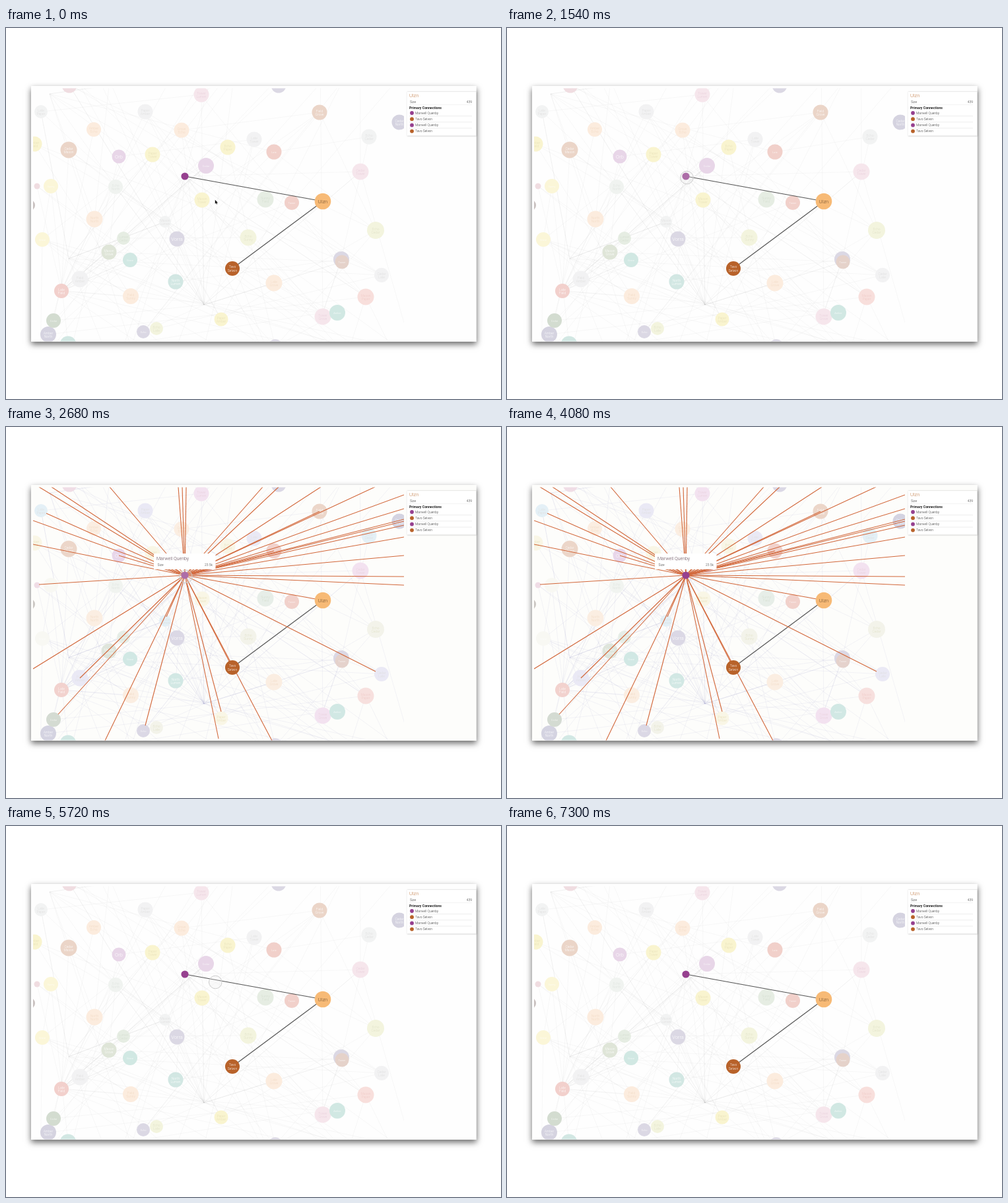
Write an HTML page with a canvas that moves like this. It is 750 px wide and 563 px high and loops after 7.94 s.

```html
<!DOCTYPE html>
<html lang="en">
<head>
<meta charset="utf-8">
<title>Connection graph</title>
<style>
  html, body { margin: 0; width: 100%; height: 100%; overflow: hidden; background: #fff; }
  canvas { display: block; }
</style>
</head>
<body>
<canvas id="stage" width="750" height="563"></canvas>
<script>
const W = 750, H = 563, LOOP = 7940;
const FONT = 'Roboto, "Liberation Sans", sans-serif';
const HUB = [271, 225], CHANNEL = [480, 263], PLAYER = [343, 365];
const PURPLE = '#96408f', BROWN = '#b8622a', ORANGE = '#d2673a';

// Each group: idle colour, hovered colour, label ink, label lines, nodes as [x, y, radius = 11.5, label]
const groups = [
  ['#f2f2f3', '#eae9f5', '#ddd', 2, [[211, 127], [376, 169], [112, 381, 12.5], [569, 375, 11]]],
  ['#f2f3f3', '#e4f0f6', '#ddd', 2, [[53, 127, 10], [550, 165], [241, 294, 9]]],
  ['#f0f3f0', '#f1f4f0', '#dce2dc', 2, [[166, 241, 11]]],
  ['#f9f4cf', '#f9f6e6', '#e6dfb8', 2, [[222, 192], [336, 181], [43, 176], [297, 261], [326, 442, 10.5]]],
  ['#fbf6d8', '#f8f8f3', '#fff', 1, [[68, 240, 11], [55, 321, 11]]],
  ['#f3f4de', '#f3f3ea', '#dfe0c6', 2, [[228, 456, 10], [367, 318, 12.5], [560, 307, 13]]],
  ['#fcecde', '#fbeee2', '#f0d9c4', 2, [[133, 154, 11], [266, 155], [134, 290, 12.5], [189, 407, 12], [406, 387, 12.5]]],
  ['#ebd5c8', '#ecd6c9', '#fff', 2, [[95, 185, 12.5], [475, 128]]],
  ['#f1d0ca', '#f1d1cb', '#fff', 1, [[406, 188], [433, 265, 11]]],
  ['#f2d0cc', '#f2d2ce', '#fff', 2, [[84, 399, 11]]],
  ['#f8dfdc', '#f7e0de', '#eec9c6', 2, [[545, 408, 12.5]]],
  ['#f6e6ec', '#f3e2f0', '#e8cfdb', 2, [[296, 101], [537, 218, 12.5], [480, 438, 12.5]]],
  ['#f0dde1', '#f0dde6', '#fff', 0, [[96, 87], [47, 240, 4.5]]],
  ['#e8d6e8', '#e8d6ea', '#fff', 1, [[171, 195, 10.5, 'Orb'], [303, 209, 12]]],
  ['#dbd8e4', '#dbd8e5', '#fff', 1, [[259, 320, 11.5, 'Vorra'], [208, 461, 10], [413, 87], [508, 351, 12], [408, 484]]],
  ['#d5d3e0', '#d4d3e1', '#fff', 2, [[64, 465, 12], [596, 143]]],
  ['#e5d2ca', '#e5d2cc', '#fff', 1, [[509, 355, 10.5]]],
  ['#d1e8e3', '#d1e8e4', '#fff', 1, [[188, 352, 11], [502, 432, 12]]],
  ['#d2e7e3', '#d2e8e4', '#fff', 2, [[257, 385], [94, 480, 12.5]]],
  ['#dfe5d8', '#dfe5dc', '#fff', 2, [[156, 340]]],
  ['#d3dcd0', '#d4dbd2', '#fff', 1, [[72, 444, 11]]],
  ['#e6ede3', '#e7eee8', '#d3ddcf', 2, [[178, 319, 10], [393, 260, 12.5]]],
  ['#c9c1c0', '#cbc7c3', '#fff', 0, [[35, 269, 9]]],
];
const words = ['Paper', 'Lumen', 'North', 'Cedar', 'Sunny', 'Field', 'Grove', 'Mason', 'Tower', 'Late', 'Echo', 'Amber'];

// Far ends of the highlighted connections
const topEnds = [50, 69, 157, 261, 267, 273, 389, 413, 477, 559];
const rightEnds = [103, 124, 140, 143, 149, 167, 195, 227, 240];
const nodeEnds = [[61, 131], [41, 142], [41, 178], [171, 195], [50, 239], [41, 367], [112, 381], [79, 436],
  [150, 476], [211, 453], [243, 288], [322, 473], [326, 432], [403, 476], [560, 371], [406, 188], [475, 128], PLAYER, CHANNEL];
const connections = [...topEnds.map(x => [x, 91]), ...rightEnds.map(y => [603, y]), ...nodeEnds];

function seeded(seed) {
  return () => (seed = (seed * 16807) % 2147483647) / 2147483647;
}

function disc(g, [x, y], r, fill) {
  g.beginPath();
  g.arc(x, y, r, 0, 7);
  g.fillStyle = fill;
  g.fill();
}

function line(g, from, to, color, width = 1) {
  g.beginPath();
  g.moveTo(...from);
  g.lineTo(...to);
  g.strokeStyle = color;
  g.lineWidth = width;
  g.stroke();
}

function text(g, str, x, y, size, color, align = 'left', weight = 300) {
  g.font = `${weight} ${size}px ${FONT}`;
  g.textAlign = align;
  g.fillStyle = color;
  g.fillText(str, x, y);
}

function drawWindow(g, tint) {
  g.fillStyle = '#fff';
  g.fillRect(0, 0, W, H);
  g.save();
  g.shadowColor = 'rgba(0,0,0,.6)';
  g.shadowBlur = 9;
  g.shadowOffsetY = 4;
  g.fillRect(38, 88, 674.5, 388);
  g.restore();
  g.fillStyle = tint;
  g.fillRect(38, 88, 674.5, 388);
}

function drawWeb(g, color) {
  const random = seeded(4127);
  const nodes = groups.flatMap(group => group[4]);
  const pick = () => nodes[Math.floor(random() * nodes.length)];
  const hubs = [[66, 100], [95, 350], [84, 399], HUB, [480, 432], [300, 420]];
  for (let i = 0; i < 170; i++) {
    const from = i % 2 ? hubs[Math.floor(random() * hubs.length)] : pick();
    const to = random() < .6 ? pick() : [30 + random() * 590, random() < .5 ? 80 : 490];
    line(g, from.slice(0, 2), to.slice(0, 2), color, .8);
  }
}

function drawNodes(g, hovered) {
  const random = seeded(91);
  const word = () => words[Math.floor(random() * words.length)];
  for (const [idle, active, ink, lines, nodes] of groups) {
    for (const [x, y, r = 11.5, label] of nodes) {
      disc(g, [x, y], r, hovered ? active : idle);
      if (label) text(g, label, x, y + 2.5, 7.5, ink, 'center');
      else if (lines === 1) text(g, word(), x, y + 1.5, 4, ink, 'center');
      else if (lines === 2) {
        text(g, word(), x, y - .5, 5, ink, 'center');
        text(g, word(), x, y + 4.5, 5, ink, 'center');
      }
    }
  }
}

function drawSidebar(g) {
  g.save();
  g.shadowColor = 'rgba(0,0,0,.25)';
  g.shadowBlur = 2;
  g.fillStyle = '#fff';
  g.fillRect(607.5, 97, 105, 66.5);
  g.restore();
  text(g, 'Ulzn', 611, 104.5, 7.5, '#c07a45');
  text(g, 'Size', 612, 113.5, 5, '#333');
  text(g, '439', 706, 113.5, 5, '#333', 'right');
  line(g, [611, 116.5], [706, 116.5], '#eee', .7);
  text(g, 'Primary Connections', 611, 123.3, 5.2, '#222', 'left', 700);
  for (let i = 0; i < 4; i++) {
    const y = 129 + i * 9.2;
    disc(g, [615, y], 2.9, i % 2 ? BROWN : PURPLE);
    text(g, i % 2 ? 'Tavo Selwin' : 'Marwell Quenby', 620, y + 1.8, 5, '#333');
    if (i < 3) line(g, [611, y + 4.6], [706, y + 4.6], '#e6e6e6', .7);
  }
}

function drawTooltip(g) {
  g.fillStyle = '#fff';
  g.fillRect(224, 192, 93.5, 24);
  text(g, 'Marwell Quenby', 228, 202, 7, '#5c4350');
  text(g, 'Size', 229.5, 211, 5, '#333');
  text(g, '23.5k', 313, 211, 5, '#333', 'right');
}

function buildScene(hovered) {
  const canvas = document.createElement('canvas');
  canvas.width = W;
  canvas.height = H;
  const g = canvas.getContext('2d');
  drawWindow(g, hovered ? '#fdfdfb' : '#fefefe');
  g.save();
  g.beginPath();
  g.rect(41, 91.5, 562, 384);
  g.clip();
  drawWeb(g, hovered ? 'rgba(120,120,180,.1)' : 'rgba(90,90,90,.06)');
  drawNodes(g, hovered);
  line(g, CHANNEL, PLAYER, '#555', 1.2);
  if (hovered) connections.forEach(end => line(g, HUB, end, ORANGE, 1.1));
  else line(g, HUB, CHANNEL, '#555', 1.2);
  disc(g, HUB, 5.6, PURPLE);
  disc(g, CHANNEL, 12.3, '#f7ba76');
  disc(g, PLAYER, 11, BROWN);
  text(g, 'Ulzn', 480, 265.7, 7.5, '#6b4a2c', 'center');
  text(g, 'Tavo', 343, 364.3, 5, '#fff', 'center');
  text(g, 'Selwin', 343, 369.8, 5, '#fff', 'center');
  g.restore();
  drawSidebar(g);
  if (hovered) drawTooltip(g);
  return canvas;
}

const clamp = v => Math.max(0, Math.min(1, v));
const progress = (t, start, end) => clamp((t - start) / (end - start));
const ease = u => u < .5 ? 4 * u ** 3 : 1 - 4 * (1 - u) ** 3;
const mix = (a, b, u) => a + (b - a) * u;

function drawPointer(g, t) {
  const alpha = progress(t, 580, 880) - progress(t, 3580, 3880)
    + progress(t, 4080, 4280) - progress(t, 5720, 6100);
  if (alpha <= 0) return;
  const approach = ease(progress(t, 1040, 1540));
  const leave = ease(progress(t, 4020, 4760));
  const x = mix(mix(287.5, 272.5, approach), 317.3, leave);
  const y = mix(mix(231.5, 227, approach), 237, leave);
  g.globalAlpha = alpha;
  disc(g, [x, y], 9.8, 'rgba(235,235,235,.27)');
  g.strokeStyle = '#ccc';
  g.lineWidth = 1;
  g.stroke();
}

function drawArrow(g, t) {
  g.globalAlpha = 1 - progress(t, 20, 340);
  g.fillStyle = '#111';
  g.fill(new Path2D('M316.8 260.8v6l1.4-1.2 .9 2 1-.5-.9-1.9h1.8z'));
}

const stage = document.getElementById('stage').getContext('2d');
const idleScene = buildScene(false);
const hoverScene = buildScene(true);

function render(t) {
  stage.globalAlpha = 1;
  stage.drawImage(idleScene, 0, 0);
  stage.globalAlpha = progress(t, 2040, 2660) - progress(t, 4090, 4560);
  stage.drawImage(hoverScene, 0, 0);
  drawPointer(stage, t);
  drawArrow(stage, t);
}

const began = performance.now();
function tick() {
  render((performance.now() - began) % LOOP);
  requestAnimationFrame(tick);
}
tick();
</script>
</body>
</html>
```
